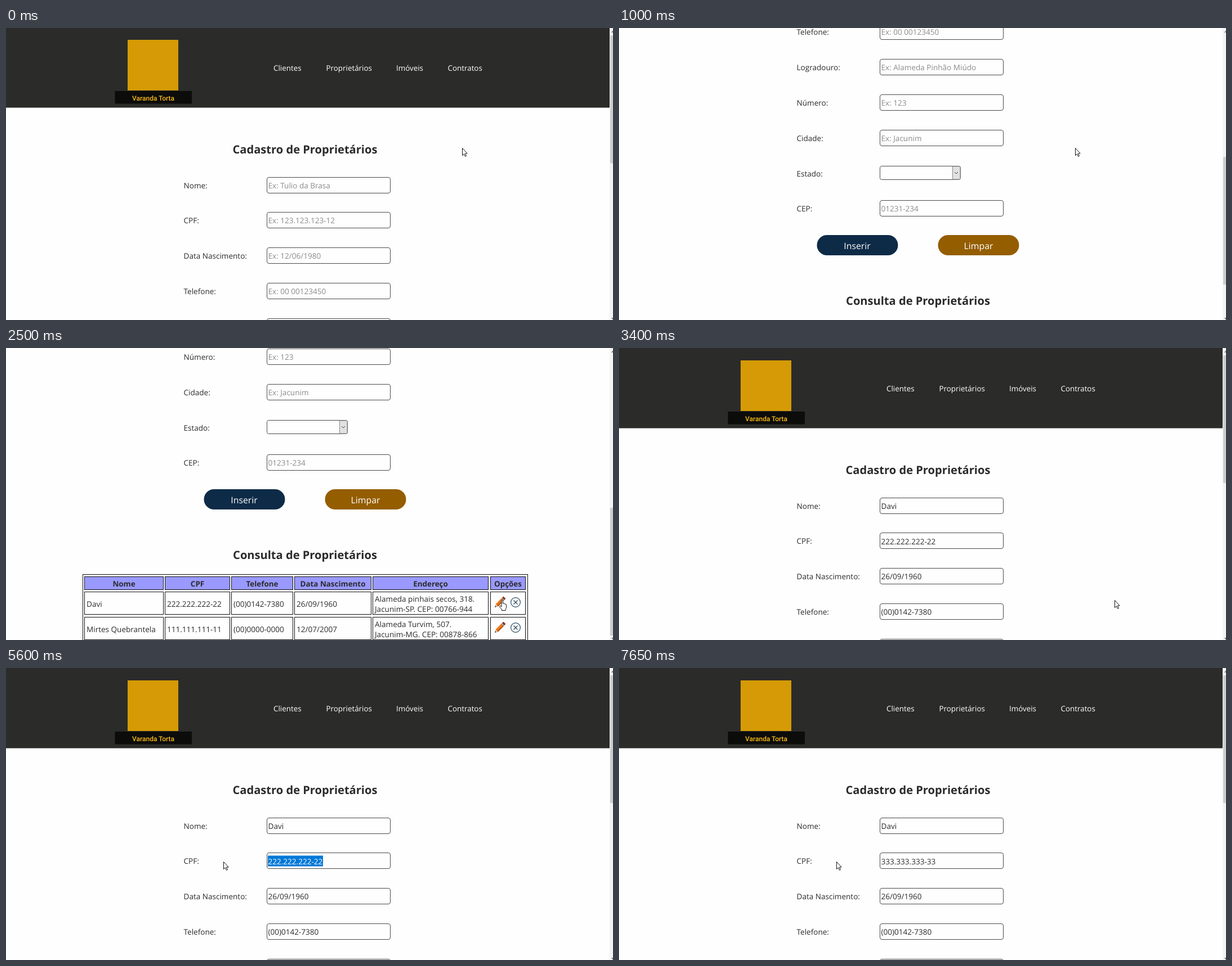
These frames come from a looping animation (1078 by 519 pixels, 8000 ms). An HTML page:

```html
<!DOCTYPE html>
<html lang="pt-BR">
<head>
<meta charset="utf-8">
<title>Cadastro de Proprietários</title>
<style>
  html, body { margin: 0; width: 100%; height: 100%; overflow: hidden; background: #fefefe; }
  svg { display: block; width: 1078px; height: 519px; }
  text { font: 13.55px "Open Sans", "Noto Sans", sans-serif; fill: #2b2b2b; white-space: pre; text-rendering: geometricPrecision; }
  .nav { font-size: 13.4px; fill: #fff; }
  .title { font-size: 20.1px; font-weight: 700; text-anchor: middle; }
  .head { font-size: 13.4px; font-weight: 700; text-anchor: middle; }
  .button { font-size: 15.8px; fill: #fff; text-anchor: middle; }
  .brand { font: 500 12px Roboto, sans-serif; fill: #fdbd14; text-anchor: middle; }
  .hint { fill: #8b8b8b; }
  .selected { fill: #fff; }
  .box { fill: #fefefe; stroke: #4a4a4a; }
  .cell { fill: none; stroke: #111; }
  .th { fill: #9999ff; stroke: #111; }
</style>
</head>
<body>
<svg viewBox="0 0 1078 519">
  <defs>
    <g id="options">
      <g transform="translate(877 1031) rotate(-45)">
        <path d="M-12.5 0L-7.5 -3V3Z" fill="#e9c08c"/>
        <path d="M-12.5 0L-10 -1.5V1.5Z" fill="#333"/>
        <rect x="-7.5" y="-3" width="15" height="6" fill="#ec7a1c"/>
        <rect x="-7.5" y="1" width="15" height="2" fill="#b9500f"/>
        <rect x="6.5" y="-3" width="2" height="6" fill="#9aa0a4"/>
        <rect x="8.5" y="-3" width="3.5" height="6" rx="1.2" fill="#8e3426"/>
      </g>
      <g fill="none" stroke="#24465f" stroke-width="1.2">
        <circle cx="905" cy="1031" r="8.4"/>
        <path d="M901.5 1027.5l7 7m0-7l-7 7"/>
      </g>
    </g>
  </defs>

  <g id="page">
    <rect width="1072" height="142.6" fill="#2b2b2a"/>
    <rect x="216" y="22" width="90" height="90" fill="#d59a05"/>
    <rect x="193.5" y="113" width="136.5" height="22.5" fill="#0c0c0b"/>
    <text class="brand" x="261.5" y="130">Varanda Torta</text>
    <text class="title" x="531" y="223.5">Cadastro de Proprietários</text>
    <g id="form"></g>
    <g id="hints"></g>
    <g id="values"></g>
    <text id="typed" x="465.5" y="349">333.333.333-33</text>
    <g id="selection">
      <rect x="465" y="333.5" width="98" height="19" fill="#0078d7"/>
      <text class="selected" x="465.5" y="349">222.222.222-22</text>
    </g>
    <rect id="caret" y="334" width="1" height="18" fill="#111"/>

    <rect class="box" x="463.5" y="707.5" width="143" height="24" rx="3"/>
    <path d="M592.5 708H604a2 2 0 0 1 2 2V729a2 2 0 0 1-2 2H592.5Z" fill="#e1e1e1" stroke="#8a8a8a"/>
    <path d="M596 718l3 3 3-3" fill="none" stroke="#444"/>

    <rect x="351.5" y="830" width="144" height="36" rx="18" fill="#0d2b47"/>
    <rect x="566.5" y="830" width="144" height="36" rx="18" fill="#945d00"/>
    <text class="button" x="423" y="855">Inserir</text>
    <text class="button" x="638.5" y="855">Limpar</text>

    <text class="title" x="531" y="953.5">Consulta de Proprietários</text>
    <g id="table"></g>
  </g>

  <rect x="1072" width="6" height="519" fill="#f3f3f3"/>
  <rect id="thumb" x="1073" y="13" width="5" height="227" fill="#cdcdcd"/>
  <path d="M1076 8l2-2.5M1076 515l2 2.5" stroke="#505050" stroke-width="1.3"/>

  <g id="arrow">
    <path d="M.5 .5V13.6L3.4 10.8 5.5 15.4 7.5 14.5 5.4 10H9.2Z" fill="#fff" stroke="#111"/>
  </g>
  <path id="hand" transform="translate(876 447)" fill="#fff" stroke="#111"
    d="M4 12V2.2Q4 .6 5.2 .6T6.4 2.2V7Q8.6 6 8.8 7.8 10.6 6.8 10.8 8.6 12.5 8 12.5 9.8V13.5Q12.5 16 11 17.5V19.5H4.5V18Q2.5 15.5 .9 13.2 .2 11.6 1.6 11.2 2.8 11 4 13Z"/>
</svg>

<script>
const LOOP = 8000;
const $ = id => document.getElementById(id);

function add(parent, tag, attrs, content = '') {
  const el = document.createElementNS('http://www.w3.org/2000/svg', tag);
  for (const key in attrs) el.setAttribute(key, attrs[key]);
  el.textContent = content;
  parent.append(el);
  return el;
}
const label = (parent, x, y, content, cls = '') => add(parent, 'text', { x, y, class: cls }, content);
const box = (parent, x, y, width, height, cls, rx = 0) =>
  add(parent, 'rect', { x: x + .5, y: y + .5, width, height, class: cls, rx });

// Plays a track of [time, value] pairs as hard steps.
function play(el, prop, track, format = v => v) {
  const frames = track.map(([t, v]) => ({ offset: t / LOOP, [prop]: format(v), easing: 'step-end' }));
  frames.push({ offset: 1, [prop]: format(track.at(-1)[1]) });
  el.animate(frames, { duration: LOOP, iterations: Infinity });
}

// Navigation and form
[['Clientes', 475], ['Proprietários', 568.5], ['Imóveis', 693], ['Contratos', 784.5]]
  .forEach(([name, x]) => label($('page'), x, 77, name, 'nav'));

const fields = [
  ['Nome:', 266, 'Ex: Tulio da Brasa', 'Davi'],
  ['CPF:', 328, 'Ex: 123.123.123-12'],
  ['Data Nascimento:', 391, 'Ex: 12/06/1980', '26/09/1960'],
  ['Telefone:', 454, 'Ex: 00 00123450', '(00)0142-7380'],
  ['Logradouro:', 517, 'Ex: Alameda Pinhão Miúdo', ''],
  ['Número:', 580, 'Ex: 123', ''],
  ['Cidade:', 643, 'Ex: Jacunim', ''],
  ['CEP:', 768, '01231-234', '']
];
for (const [name, top, hint, value] of fields) {
  const y = top + 20;
  label($('form'), 315.5, y, name);
  box($('form'), 463, top, 219, 28, 'box', 3.5);
  label($('hints'), 465.5, y, hint, 'hint');
  if (value) label($('values'), 465.5, y, value);
}
label($('form'), 315.5, 725.5, 'Estado:');
const oldCpf = label($('values'), 465.5, 349, '222.222.222-22');

// Table
const table = $('table');
const columns = [['Nome', 139, 140], ['CPF', 282, 115], ['Telefone', 400, 109],
  ['Data Nascimento', 512, 136], ['Endereço', 651, 205], ['Opções', 860, 62]];
const people = [
  ['Davi', '222.222.222-22', '(00)0142-7380', '26/09/1960',
    ['Alameda pinhais secos, 318.', 'Jacunim-SP. CEP: 00766-944']],
  ['Mirtes Quebrantela', '111.111.111-11', '(00)0000-0000', '12/07/2007',
    ['Alameda Turvim, 507.', 'Jacunim-MG. CEP: 00878-866']]
];
box(table, 136, 981, 790, 160, 'cell');
for (const [name, x, width] of columns) {
  box(table, x, 985, width, 23, 'th');
  label(table, x + width / 2 + .5, 1003, name, 'head');
}
people.forEach((person, row) => {
  const dy = row * 45;
  columns.forEach(([, x, width], i) => {
    box(table, x, 1012 + dy, width, 40, 'cell');
    const value = person[i];
    if (Array.isArray(value)) value.forEach((line, n) => label(table, x + 4, 1030 + dy + n * 18, line));
    else if (value) label(table, x + 4, 1038.5 + dy, value);
  });
  add(table, 'use', { href: '#options', y: dy });
});

// Scrolling
const scroll = [[0, 1], [50, 75], [150, 135],
  [450, 150], [500, 215], [550, 300], [600, 370], [700, 405],
  [1000, 462], [1100, 515], [1200, 535], [1250, 540],
  [1400, 551], [1450, 570], [1500, 577], [1600, 579], [3300, 0]];
play($('page'), 'transform', scroll, y => `translate(0px, ${-y}px)`);
play($('thumb'), 'transform', scroll, y => `translate(0px, ${y * .468}px)`);

// Pointer
const pointer = [[0, [810, 213]],
  [2050, [794, 236]], [2100, [735, 306]], [2150, [660, 388]], [2200, [627, 430]],
  [2300, [760, 446]], [2400, [887, 444]], [2500, [880, 448]],
  [3950, [868, 444]], [4000, [812, 426]], [4050, [712, 394]], [4150, [603, 357]],
  [5600, [386, 344]]];
play($('arrow'), 'transform', pointer, ([x, y]) => `translate(${x}px, ${y}px)`);
play($('arrow'), 'opacity', [[0, 1], [2500, 0], [3300, 1], [4200, 0], [5600, 1]]);
play($('hand'), 'opacity', [[0, 0], [2500, 1], [3300, 0]]);

// Filled form, selection and typing
play($('hints'), 'opacity', [[0, 1], [3300, 0]]);
play($('values'), 'opacity', [[0, 0], [3300, 1]]);
play(oldCpf, 'opacity', [[0, 1], [5950, 0]]);
play($('selection'), 'opacity', [[0, 0], [4800, 1], [5950, 0]]);
play($('selection'), 'clipPath', [[0, 98], [4800, 62], [4900, 24], [4950, 0]], x => `inset(0px 0px 0px ${x}px)`);

const typed = $('typed');
const typing = [[0, 0], [5950, 1], [6050, 2], [6150, 4], [6250, 5],
  [6400, 6], [6500, 7], [6600, 8], [6700, 9], [6850, 10],
  [7000, 11], [7200, 12], [7300, 13], [7350, 14]];
const widthOf = n => n ? typed.getSubStringLength(0, n) : 0;
const total = widthOf(14);
play(typed, 'clipPath', typing, n => `inset(0px ${total - widthOf(n)}px 0px 0px)`);
play($('caret'), 'transform', [[0, 14], ...typing.slice(1)], n => `translate(${Math.floor(465.5 + widthOf(n))}px, 0px)`);
play($('caret'), 'opacity', [[0, 0], [4650, 1], [4800, 0], [5950, 1], [7650, 0]]);
</script>
</body>
</html>
```
